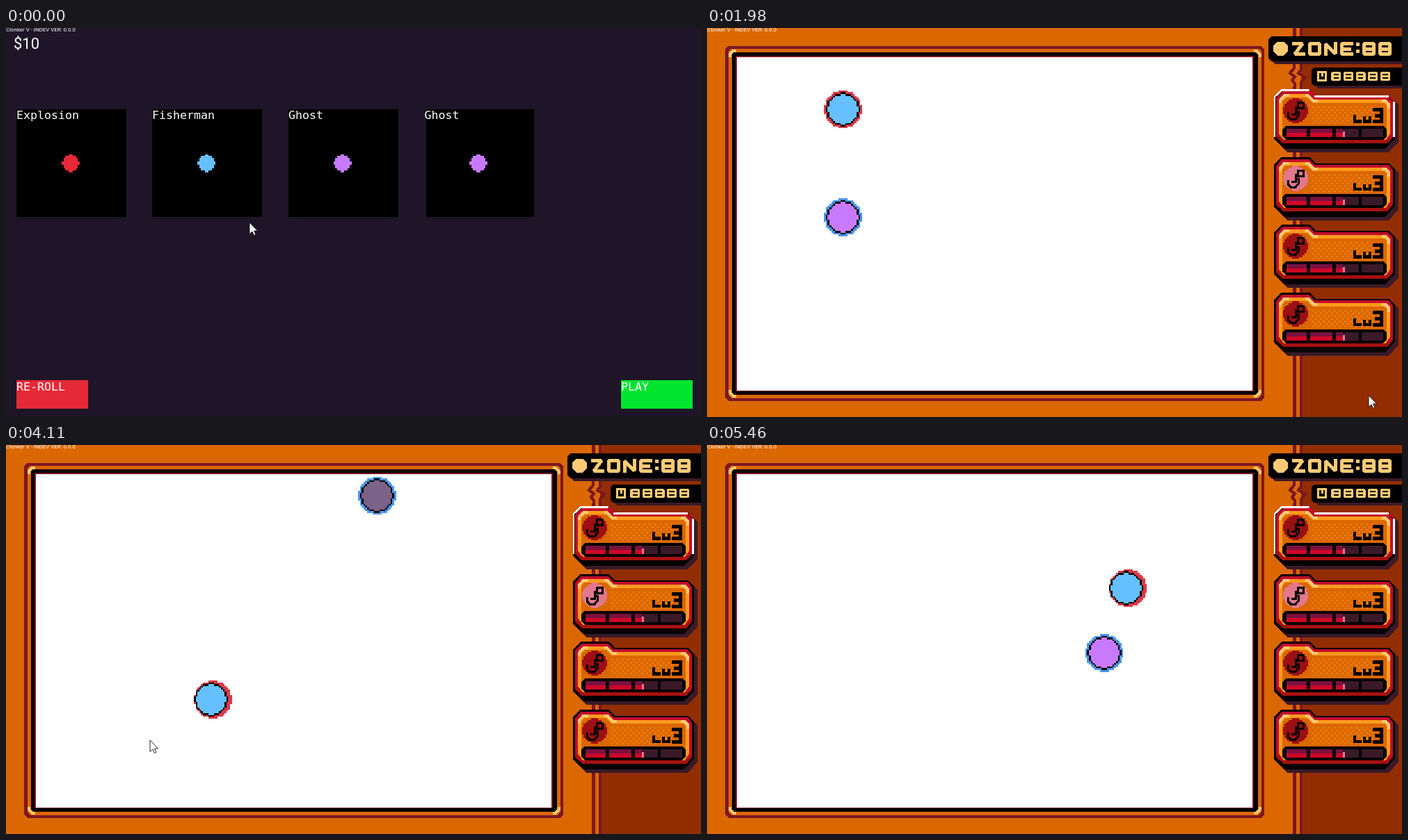
Recreate the animation shown at these times as an HTML page. Size 999x560 px, loop 5490 ms.

```html
<!DOCTYPE html>
<html lang="en">
<head>
<meta charset="utf-8">
<title>Arena shop and battle</title>
<style>
html, body { margin: 0; width: 100%; height: 100%; overflow: hidden; background: #1e1628; }
svg { display: block; width: 999px; height: 560px; }
text { fill: #fff; white-space: pre; }
.mono { font: 16.6px "DejaVu Sans Mono", monospace; }
.small { font: 7.7px Roboto, sans-serif; }
.tiny { font: 7.9px Roboto, sans-serif; }
.money { font: 22px Roboto, sans-serif; }
.crisp { shape-rendering: crispEdges; }
</style>
</head>
<body>
<svg id="stage" viewBox="0 0 999 560"></svg>
<script>
const LOOP = 5490, PX = 2.6;
const C = {
  night: '#1e1628', red: '#e62937', sky: '#66bfff', purple: '#c87aff', green: '#00e430',
  orange: '#db6700', bright: '#ff9a1c', cream: '#ffca74', maroon: '#7b1726', brown: '#922d00',
  shade: '#3a1a28', crimson: '#c40c2c', dark: '#9c0f12', faded: '#7a6289'
};

const rect = (x, y, w, h, fill, extra = '') =>
  `<rect x="${x}" y="${y}" width="${w}" height="${h}" fill="${fill}" ${extra}/>`;
const shape = (d, fill) => `<path d="${d}" fill="${fill}"/>`;
const line = (d, color, width, join = 'miter') =>
  `<path d="${d}" fill="none" stroke="${color}" stroke-width="${width}" stroke-linejoin="${join}"/>`;
const label = (x, y, text, cls, id = '') =>
  `<text x="${x}" y="${y}" class="${cls}" ${id && `id="${id}"`}>${text}</text>`;

// Rectangle with cut corners
const cut = (x0, y0, x1, y1, c, fill) => shape(
  `M${x0 + c} ${y0}H${x1 - c}L${x1} ${y0 + c}V${y1 - c}L${x1 - c} ${y1}H${x0 + c}L${x0} ${y1 - c}V${y0 + c}Z`, fill);

// Pixelated disc built row by row; size is its diameter in art pixels
function disc(cx, cy, size, fill, id = '', inset = .31) {
  const r = size / 2, odd = size % 2 / 2;
  let d = '';
  for (let i = 0; i < size; i++) {
    const y = i + .5 - r;
    const half = Math.round(Math.sqrt(Math.max(0, (r - inset) ** 2 - y * y)) - odd) + odd;
    d += `M${-half * PX} ${(i - r) * PX}h${half * 2 * PX}v${PX + .05}h${-half * 2 * PX}z`;
  }
  return `<path ${id && `id="${id}"`} transform="translate(${cx} ${cy})" d="${d}" fill="${fill}"/>`;
}

// ---- Shop ----
const cards = [
  { x: 15, w: 158, tx: 15, name: 'Explosion', color: C.red },
  { x: 210, w: 158, tx: 210, name: 'Fisherman', color: C.sky },
  { x: 406, w: 157.5, tx: 406, name: 'Ghost', color: C.purple, sold: 660 },
  { x: 603.5, w: 155, tx: 601.5, name: 'Ghost', color: C.purple, sold: 1290 }
];

function shop() {
  const list = cards.map((c, i) => `<g id="card${i}">
    ${rect(c.x, 116.5, c.w, 155.5, '#000', `id="back${i}"`)}
    ${label(c.tx, 130.5, c.name, 'mono')}
    ${disc(93 + i * 195.3, 194.5, 10, c.color)}</g>`).join('');
  const panel = `<g id="panel">${rect(829, 116, 157, 55, '#000')}
    ${label(829, 122, 'Ghost', 'small')}
    ${label(829, 134, 'rank: 1', 'small', 'rank')}
    ${label(829, 145.5, 'health: 73', 'small')}${label(884, 145.5, 'speed: 6.000000', 'small')}
    ${label(829, 157.5, 'dmg: 32', 'small')}${label(884, 157.5, 'fric: 0.003000', 'small')}</g>`;
  return rect(0, 0, 999, 560, C.night) + list + panel +
    rect(15, 507, 102.5, 40.5, C.red) + label(15, 522, 'RE-ROLL', 'mono') +
    rect(884, 507, 103, 40.5, C.green, 'id="play"') + label(884, 522, 'PLAY', 'mono') +
    label(11, 29.5, '$10', 'money', 'money');
}

// ---- Battle ----
const glyphs = {
  Z: 'M0 2.5H15L4 17.5H19', O: 'M2.5 2.5H16.5V17.5H2.5Z', N: 'M2.5 20V3L16.5 17V0',
  E: 'M19 2.5H2.5V17.5H19M2.5 10H16', ':': 'M0 3.5H5M0 13.5H5',
  8: 'M2.5 2.5H16.5V17.5H2.5ZM2.5 10H16.5'
};
function lettering(text, x, y, sx, sy, weight) {
  let at = 0, out = '';
  for (const ch of text) {
    out += `<g transform="translate(${at})">${line(glyphs[ch], C.cream, weight, 'bevel')}</g>`;
    at += ch === ':' ? 9 : 22.9;
  }
  return `<g role="img" aria-label="${text}" transform="translate(${x} ${y}) scale(${sx} ${sy})">${out}</g>`;
}

function board() {
  const corner = (x, y, dx, dy) =>
    line(`M${x} ${y + 9 * dy}V${y + 5 * dy}L${x + 5 * dx} ${y}H${x + 9 * dx}`, C.cream, 4);
  return cut(26, 25.5, 801, 537, 5, C.maroon) + cut(30.5, 30, 797, 532.5, 4, C.orange) +
    corner(33, 32.5, 1, 1) + corner(794.5, 32.5, -1, 1) + corner(33, 530, 1, -1) + corner(794.5, 530, -1, -1) +
    cut(35.7, 35, 791.5, 527.5, 3, '#000') + rect(40.7, 39.7, 745.5, 483.3, C.maroon) + rect(43, 42, 741, 480, '#fff');
}

function unitCard(i) {
  const outline = 'M815 99L826 88H866L875 97H980L989 106V159L975 174H829L815 160Z';
  const selected = i === 0;
  const dots = rect(868, 113, 92, 25, 'url(#dots)');
  const key = 'M849.500 107.500H857.500V115.500H849.500ZM850 114H846V120H850.500V126L846 131.500H839L835.500 128V121M840 124H846V120';
  let bar = cut(827, 141, 977, 161, 5, '#000');
  [[833, 29], [867, 32], [904, 33], [941, 31]].forEach(([x, w], n) => {
    const full = n < 2 ? w : n === 2 ? 10 : 0;
    bar += rect(x, 145, w, 12, C.shade) + rect(x, 145, full, 6, '#7a1140') + rect(x, 151, full, 6, '#cf0628');
  });
  bar += rect(914, 149, 3, 8, '#e2778d');
  return `<g transform="translate(0 ${i * 97.5})">
    <path d="${outline}" transform="translate(5 5)" fill="${C.shade}"/>
    ${shape(outline, '#000')}
    ${shape('M818 101L827 91H865L873 99H979L986 107V157L978 166H828L818 157Z', C.crimson)}
    ${shape('M818 152L828 161H978L986 153V157L978 166H828L818 157Z', '#a81010')}
    ${shape('M822 104L829 95H864L872 103H976L982 109V152L976 161H829L822 152Z', C.bright)}
    ${shape('M827 106L832 100H862L870 108H973L977 112V157H827Z', C.orange)}
    ${line('M824 108V104L830 97H837M860 97H864L872 105H878M970 105H975L980 110V116', C.cream, 4)}
    ${selected ? line('M816 157V99L826.500 89.300H866M873 98.300H980M987.700 106V157', '#fff', 2.6) +
      line('M866 89.500L873.500 97M980.500 98.500L987.500 105.500', C.crimson, 2.6) : ''}
    ${dots}${disc(846, 119, 14, i === 1 ? '#e2778d' : C.dark)}${line(key, '#000', 3)}
    <g role="img" aria-label="Lv3">${line('M931 125V134.500H940.500M945 127V134.500H953V127', '#000', 4.2)}
    ${line('M957 117.300H969.500V134.700H957M960 126H970', '#000', 5)}</g>
    ${bar}</g>`;
}

function hud() {
  const rails = rect(842, 0, 157, 560, C.maroon) + rect(847, 0, 4.5, 560, C.orange) + rect(856, 0, 143, 560, C.brown);
  const crack = rect(841, 52, 16, 32, C.orange) + rect(854, 52, 14, 32, C.brown) +
    line('M844 52V58L838 65L845 70L841 75L845 80V86M854 52V60L850 65L860 71L854 78V86', C.maroon, 4);
  const plates = shape('M812 16H999V52H816L810 46Z', C.shade) + shape('M807 16L811 12H999V48H811L807 44Z', '#000') +
    shape('M874 61H999V87H878L873 82Z', C.shade) + shape('M869 60L872 57H999V83H872L869 80Z', '#000');
  const disk = line('M878.500 63.500H889.500V75.500H878.500Z', C.cream, 3) + rect(883, 63, 3, 7, C.cream);
  return rails + crack + plates + cut(814, 19.5, 834.5, 40, 6, C.cream) + lettering('ZONE:88', 841, 20, 1, 1, 5) + disk +
    lettering('88888', 897, 63, .77, .66, 4.3) + [0, 1, 2, 3].map(unitCard).join('');
}

const ball = (id, ring, fill) => `<g id="${id}">${disc(0, 0, 21, ring, id + 'Ring', .1)}
  ${disc(0, 0, 19, '#000')}${disc(0, 0, 17, fill, id + 'Fill')}</g>`;

const stage = document.getElementById('stage');
stage.innerHTML = `<defs><pattern id="dots" width="7.8" height="7.8" patternUnits="userSpaceOnUse">
  ${rect(0, 0, 2.6, 2.6, '#f08414')}${rect(3.9, 3.9, 2.6, 2.6, '#f08414')}</pattern></defs>
  <g id="shop" class="crisp">${shop()}</g>
  <g id="battle" class="crisp">${rect(0, 0, 999, 560, C.orange)}${board()}${hud()}
  ${ball('ghost', '#4a97ea', C.purple)}${ball('fisher', '#d93a48', C.sky)}</g>
  ${label(0, 5, 'Clonker V - INDEV VER: 0.0.0', 'tiny')}
  <g id="cursor"><circle id="press" r="12" fill="#ffff3c" opacity=".7"/>
  <path d="M0 0V16.500L4 13L6.500 18.500L9 17.400L6.500 12H11.500Z" fill="#fff" stroke="#111" stroke-width=".9"/></g>`;

const el = {};
stage.querySelectorAll('[id]').forEach(node => el[node.id] = node);
const show = (node, on) => node.setAttribute('display', on ? 'inline' : 'none');
const place = (node, x, y) => node.setAttribute('transform', `translate(${x.toFixed(2)} ${y.toFixed(2)})`);

// ---- Motion ----
// time, x, y of the pointer tip
const pointer = [
  [0, 350, 280], [450, 511, 215], [900, 511, 215], [1050, 672, 205], [1340, 672, 205],
  [1500, 822, 332], [1740, 951, 529], [2150, 951, 529], [2500, 154, 276], [2610, 190, 264],
  [2730, 190, 264], [2790, 189, 257], [3060, 217, 370], [3270, 207, 425], [4530, 207, 425],
  [4830, 659, 553], [4900, 659, 585], [LOOP, 659, 585]
];
function pointerAt(t) {
  let i = 0;
  while (i < pointer.length - 2 && t >= pointer[i + 1][0]) i++;
  const slope = (k, axis) => {
    const a = pointer[k - 1], b = pointer[k], c = pointer[k + 1];
    if (!a || !c) return 0;
    const before = (b[axis] - a[axis]) / (b[0] - a[0]), after = (c[axis] - b[axis]) / (c[0] - b[0]);
    return before * after <= 0 ? 0 : 2 * before * after / (before + after);
  };
  const [t0, t1] = [pointer[i][0], pointer[i + 1][0]], span = t1 - t0, u = (t - t0) / span;
  return [1, 2].map(axis => {
    const p = pointer[i][axis], q = pointer[i + 1][axis];
    return p + (q - p) * u * u * (3 - 2 * u) +
      span * u * (1 - u) * (slope(i, axis) * (1 - u) - slope(i + 1, axis) * u);
  });
}

// Bounce a free position between two walls
function fold(p, lo, hi) {
  const period = 2 * (hi - lo), m = (((p - lo) % period) + period) % period;
  return lo + Math.min(m, period - m);
}

const LAUNCH = 3300, HIT = 3481, FULL_SPEED = 3840;
// Distance run after the hit: slow motion first, then steady friction
function travel(t, slow, speed, friction) {
  if (t < FULL_SPEED) return slow * (t - 3510) / 330;
  const d = t - FULL_SPEED;
  return slow + speed * d - friction * d * d;
}
function ghostAt(t) {
  if (t < HIT) {
    const u = Math.max(0, (t - LAUNCH) / (HIT - LAUNCH));
    return [195.5 - 4 * u, 272.5 - 103 * u];
  }
  const s = travel(t, 152, 1.639, .000312);
  return [fold(178 - s, 69, 758), fold(167 - .164 * s, 70, 497)];
}
function fisherAt(t) {
  if (t < HIT) return [195.5, 117];
  const s = travel(t, 149, 1.683, .0001565);
  return [197 + s / 6.08, fold(104 - s, 69, 497)];
}

function grow(node, [x, y, w, h], left, top, right, bottom) {
  const box = { x: x - left, y: y - top, width: w + left + right, height: h + top + bottom };
  for (const key in box) node.setAttribute(key, box[key]);
}

function render(t) {
  const [mx, my] = pointerAt(t), inShop = t < 1890;
  const over = ([x, y, w, h]) => mx >= x && mx <= x + w && my >= y && my <= y + h;
  show(el.shop, inShop);
  show(el.battle, !inShop);
  place(el.cursor, mx, my);
  show(el.press, t >= 2740 && t < 3600);

  if (inShop) {
    cards.forEach((c, i) => {
      const box = [c.x, 116.5, c.w, 155.5], k = over(box) ? 1 : 0;
      show(el['card' + i], !(t >= c.sold));
      grow(el['back' + i], box, 8 * k, 7 * k, 8 * k, 11 * k);
    });
    const play = [884, 507, 103, 40.5], k = over(play) ? 1 : 0;
    grow(el.play, play, 5 * k, 2 * k, 5 * k, 2 * k);
    const bought = cards.filter(c => t >= c.sold).length;
    show(el.panel, bought > 0);
    el.rank.textContent = 'rank: ' + Math.max(1, bought);
    el.money.textContent = '$' + (10 - bought);
  } else {
    place(el.ghost, ...ghostAt(t));
    place(el.fisher, ...fisherAt(t));
    place(el.fisherRing, t < HIT ? 0 : PX, 0);
    el.ghostFill.setAttribute('fill', t >= HIT && t < 4440 ? C.faded : C.purple);
  }
}

const start = performance.now();
function tick() {
  render((performance.now() - start) % LOOP);
  requestAnimationFrame(tick);
}
tick();
</script>
</body>
</html>
```
